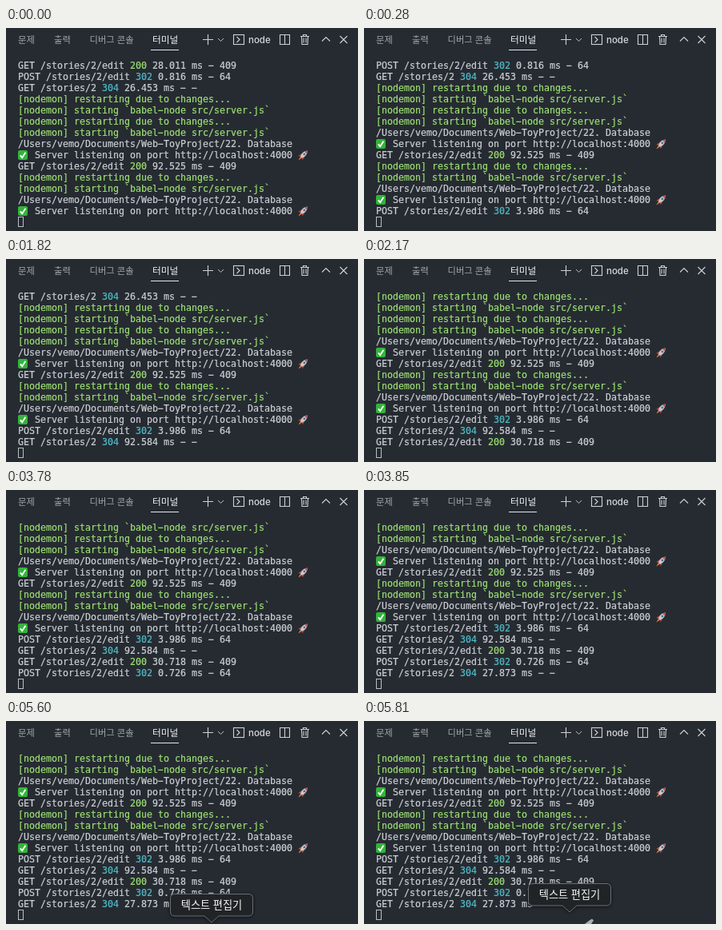
An HTML page that plays this animation: 440 by 254 pixels, repeating every 5880 ms.

```html
<!DOCTYPE html>
<html lang="ko">
<head>
<meta charset="utf-8">
<style>
  html, body { margin: 0; width: 100%; height: 100%; overflow: hidden; background: #262b32; }
  svg { display: block; }
  .ui { font-family: "Noto Sans CJK KR", "Noto Sans CJK", sans-serif; font-size: 11.3px; fill: #a1a6ac; }
  .ui .active { fill: #f0f2f4; font-size: 11.7px; }
  .ui .label { font: 500 11.5px Inter, sans-serif; fill: #d5d8dc; }
  .icons { fill: none; stroke: #cdd1d5; stroke-width: 1.1; }
  #log { font: 11.63px "DejaVu Sans Mono", monospace; fill: #cbcfd4; stroke: #cbcfd4; stroke-width: .2; }
  #log .lime { fill: #9cdf72; stroke: #9cdf72; }
  #log .cyan { fill: #4fbcc7; stroke: #4fbcc7; }
  #tip text { font: 13.2px "Noto Sans CJK KR", "Noto Sans CJK", sans-serif; fill: #f5f5f5; text-anchor: middle; }
</style>
</head>
<body>
<svg width="440" height="254" viewBox="0 0 440 254">
  <defs>
    <clipPath id="view"><rect y="40" width="440" height="197"/></clipPath>
    <g id="check" stroke="none">
      <rect width="12" height="12" rx="2" fill="#32b43a"/>
      <path d="M2.8 6.4 5.2 9.2 9.4 2.8" fill="none" stroke="#fff" stroke-width="1.9"/>
    </g>
    <g id="rocket" stroke="none">
      <path d="M5 4 0.8 7 3.6 8ZM9 8 6.2 12.2 5.2 9.6Z" fill="#c4413a"/>
      <path d="M3.4 8.2C4.6 3.8 8 .8 12.4.6 12.2 5.2 9.4 8.6 5 9.8Z" fill="#c5cad0"/>
      <path d="M12.4.6 8.8 1.7 11.4 4.2Z" fill="#c4413a"/>
      <circle cx="8.4" cy="4.9" r="1.4" fill="#4b6f8c"/>
      <path d="M3.4 8.4 0.8 12.4 4.8 9.9Z" fill="#ee8f35"/>
    </g>
  </defs>
  <rect width="440" height="254" fill="#262b32"/>

  <g class="ui">
    <text x="15" y="18.5">문제</text>
    <text x="60" y="18.5">출력</text>
    <text x="104.5" y="18.5">디버그 콘솔</text>
    <text x="183" y="18.5" class="active">터미널</text>
    <rect x="181" y="27" width="35" height="1" fill="#e4e7ea"/>
    <text x="303" y="18.5" class="label">node</text>
  </g>
  <g class="icons">
    <path d="M246 14.5H259M252.5 8V21"/>
    <path d="M265 13 268.5 16.5 272 13" stroke-width=".9"/>
    <rect x="284.5" y="8.5" width="13" height="12"/>
    <path d="M288.5 11 292 14.5 288.5 18"/>
    <path d="M342.5 8.5H354.5V20.5H342.5ZM348.5 8.5V20.5"/>
    <path d="M368 10.5H379M371.5 10.5V8.5H375.5V10.5M369.5 10.5 370 20.5H377L377.5 10.5M372 12.5V18.5M375 12.5V18.5"/>
    <path d="M395 16.5 400 11.5 405 16.5M417.5 10 426.5 19M426.5 10 417.5 19"/>
  </g>

  <g clip-path="url(#view)"><g id="log"></g></g>
  <rect x="15.5" y="236.5" width="6" height="12" fill="none" stroke="#b9bec4"/>

  <g id="tip">
    <path d="M211 203.5H303Q308.5 203.5 308.5 209V225.5Q308.5 231 303 231H266L257 239 248 231H211Q205.5 231 205.5 225.5V209Q205.5 203.5 211 203.5Z"
      fill="#202427" stroke="#6b6f73" style="filter:drop-shadow(0 1px 2px #0009)"/>
    <text x="257" y="222">텍스트 편집기</text>
    <path d="M276 254 281 250 285 247.5 287 249.5 284 254Z" fill="#a9adb0"/>
  </g>
</svg>
<script>
const LOOP = 5880, ROW = 14, LEFT = 15, COL = 7;
const SCROLL_TIMES = [280, 420, 2170, 3780, 3850];
const TIP_START = 5460, TIP_STEP = 70, TIP_STEPS = 6;

const lime = s => `<tspan class="lime">${s}</tspan>`;
const cyan = s => `<tspan class="cyan">${s}</tspan>`;
const edit = ms => `GET /stories/2/edit ${lime(200)} ${ms} ms - 409`;
const post = ms => `POST /stories/2/edit ${cyan(302)} ${ms} ms - 64`;
const show = ms => `GET /stories/2 ${cyan(304)} ${ms} ms - -`;
const restart = [
  lime('[nodemon] restarting due to changes...'),
  lime('[nodemon] starting `babel-node src/server.js`')
];
const READY = 'Server listening on port http://localhost:4000';
const boot = ['/Users/vemo/Documents/Web-ToyProject/22. Database', READY];

const lines = [
  edit('28.011'), post('0.816'), show('26.453'),
  ...restart, ...restart, ...boot,
  edit('92.525'), ...restart, ...boot,
  post('3.986'), show('92.584'), edit('30.718'), post('0.726'), show('27.873')
];

const log = document.getElementById('log');
const tip = document.getElementById('tip');

// The terminal face has wide hyphens, so a minus sign stands in for them.
log.innerHTML = lines.map((line, i) => {
  const y = 51 + i * ROW, ready = line === READY;
  const text = `<text x="${LEFT + (ready ? 3 * COL : 0)}" y="${y}">${line.replaceAll('-', '\u2212')}</text>`;
  return ready
    ? `<use href="#check" x="15" y="${y - 10}"/>${text}<use href="#rocket" x="364.5" y="${y - 10}"/>`
    : text;
}).join('');

function draw(now) {
  const t = now % LOOP;
  const scroll = SCROLL_TIMES.filter(at => t >= at).length;
  log.setAttribute('transform', `translate(0 ${-scroll * ROW})`);

  // The tooltip rises from the bottom edge in discrete steps.
  const step = Math.floor((t - TIP_START) / TIP_STEP) + 1;
  const left = 1 - Math.min(step / TIP_STEPS, 1);
  tip.style.display = step > 0 ? '' : 'none';
  tip.setAttribute('transform', `translate(0 ${52 * left * left})`);
  requestAnimationFrame(draw);
}
draw(performance.now());
</script>
</body>
</html>
```
